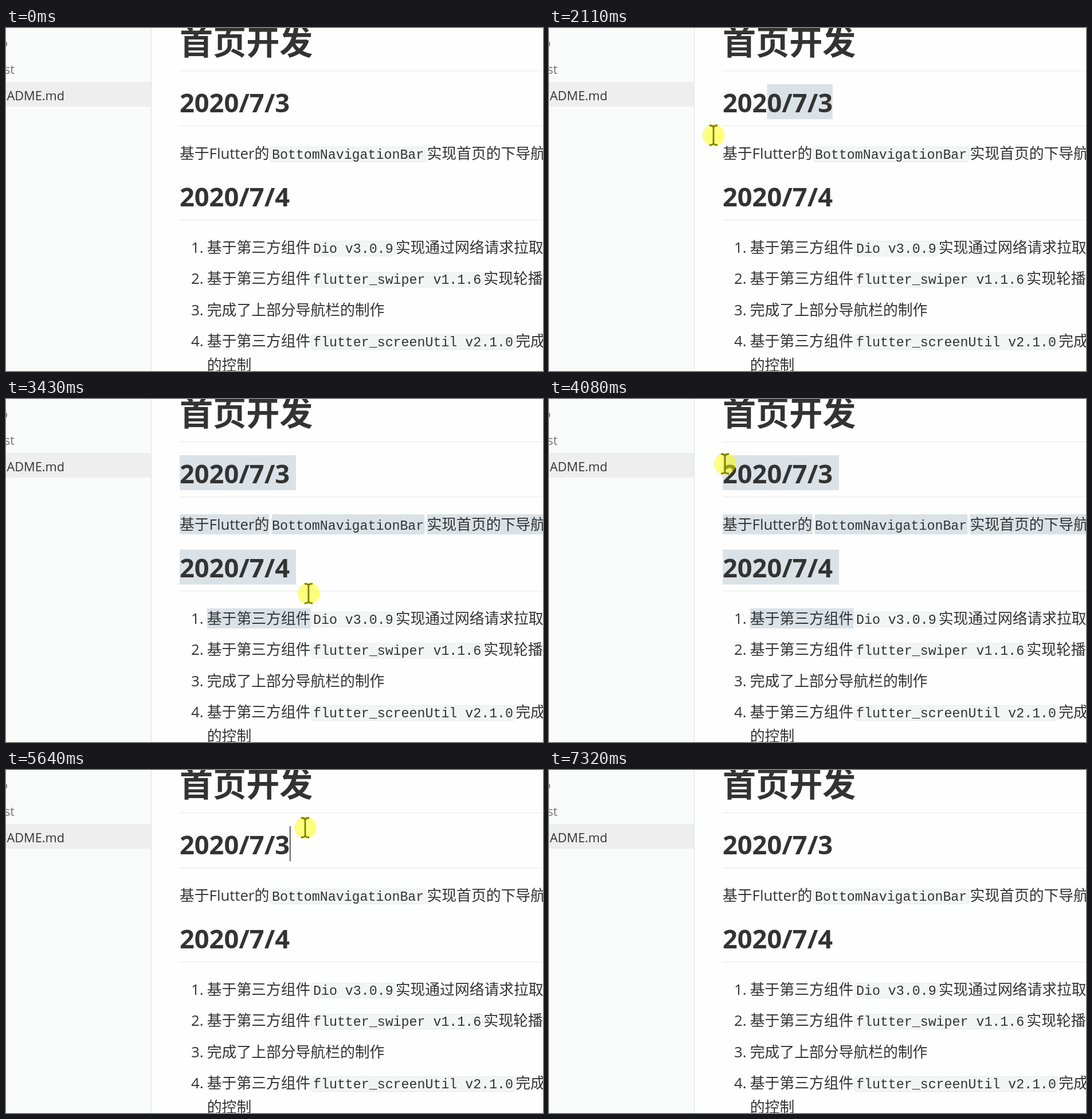
Recreate the animation shown at these times as an HTML page. Size 937 by 598 pixels, loop 7.55 s.

```html
<!DOCTYPE html>
<html lang="zh-CN">
<head>
<meta charset="utf-8">
<title>首页开发</title>
<style>
html, body { margin: 0; width: 100%; height: 100%; overflow: hidden; background: #fefefe; }
svg { display: block; width: 937px; height: 598px; }
text { font: 25.8px "Open Sans", "Noto Sans CJK SC", "Noto Sans CJK", sans-serif; fill: #333; white-space: pre; }
.h1 { font-size: 58.1px; font-weight: 700; }
.h2 { font-size: 45.2px; font-weight: 700; }
.code { font: 23.28px "Liberation Mono", monospace; }
.file { font-size: 21.7px; text-anchor: end; }
.dim { fill: #777; }
.box { fill: #f3f4f4; stroke: #e7eaed; }
.rule { fill: #eaecec; }
.sel { fill: #dae2e8; }
</style>
</head>
<body>
<svg viewBox="0 0 937 598">
  <rect width="253" height="598" fill="#f9fbfa"/>
  <rect y="94" width="253" height="43" fill="#eee"/>
  <rect x="253" width="1" height="598" fill="#dfe2e2"/>
  <g id="boxes"></g>
  <g id="selection"></g>
  <g id="words"></g>
  <rect id="caret" width="1.4" height="61" fill="#222"/>
  <g id="pointer">
    <path d="M-7-17Q0-17 0-13Q0-17 7-17M0-14V14M-7 17Q0 17 0 13Q0 17 7 17" fill="none" stroke="#000" stroke-width="2.8"/>
    <circle r="19.2" fill="#ff0" fill-opacity=".5"/>
  </g>
</svg>
<script>
const LOOP = 7550, BLINK = 530, STEP = 77;
const EM = 25.8, MONO = 13.97, LEFT = 303, INDENT = 350.8;
const NS = 'http://www.w3.org/2000/svg';
const $ = id => document.getElementById(id);

function make(tag, attrs, content) {
  const el = document.createElementNS(NS, tag);
  for (const key in attrs) el.setAttribute(key, attrs[key]);
  if (content) el.textContent = content;
  return el;
}
const add = (parent, ...spec) => $(parent).append(make(...spec));
const write = (x, y, content, cls = '') => add('words', 'text', { x, y, class: cls }, content);

// Page content
function code(x, y, content) {
  const width = content.length * MONO + 7;
  add('boxes', 'rect', { x: x - 3.5, y: y - 20.5, width, height: 26, rx: 4.5, class: 'box' });
  write(x, y, content, 'code');
}
function heading(y, content, cls) {
  write(LEFT, y, content, cls);
  add('boxes', 'rect', { x: LEFT, y: y + (cls === 'h1' ? 28.5 : 23), width: 634, height: 1.3, class: 'rule' });
}
write(3, 34, 'lib', 'file dim');
write(15, 80, 'test', 'file dim');
write(102, 126, 'README.md', 'file');
heading(45.5, '首页开发', 'h1');
heading(147, '2020/7/3', 'h2');
heading(311, '2020/7/4', 'h2');
write(LEFT, 228, '基于Flutter的');
code(464, 228, 'BottomNavigationBar');
write(734.5, 228, '实现首页的下导航');
const part = '基于第三方组件';
const items = [
  [part, 'Dio v3.0.9', '实现通过网络请求拉取'],
  [part, 'flutter_swiper v1.1.6', '实现轮播'],
  ['完成了上部分导航栏的制作'],
  [part, 'flutter_screenUtil v2.1.0', '完成']
];
items.forEach(([lead, name, rest], i) => {
  const y = 392 + i * 54.4;
  write(323, y, i + 1 + '.');
  write(INDENT, y, lead);
  if (!name) return;
  code(536, y, name);
  write(540 + name.length * MONO, y, rest);
});
write(INDENT, 597, '的控制');

// Pointer strokes: start, end, path, easing
const steady = s => s;
const settle = s => 1 - (1 - s) ** 2;
const strokes = [
  [70, 460, 'M759 585L262-40'],
  [700, 930, 'M337 0Q320 150 301 15'],
  [1080, 1810, 'M303 25C280 130 350 170 397 155L382 140'],
  [1860, 2110, 'M360 160Q320 220 287 187'],
  [2270, 2810, 'M295 215Q390 400 307 155'],
  [2960, 3510, 'M306.5 150L532.5 343', settle],
  [3680, 4080, 'M542 354L307 113', settle],
  [4310, 4540, 'M325 128L512.5 274.5'],
  [4620, 4770, 'M513 276L518 282'],
  [5090, 5150, 'M516 272L514 263'],
  [5320, 5460, 'M511 200L515 82'],
  [5640, 6300, 'M522 100.5L703 356', settle],
  [6400, 6470, 'M726 359V375'],
  [6620, 6790, 'M785 438L903 640']
].map(([start, end, d, ease = steady]) => {
  const path = make('path', { d });
  return { start, end, path, ease, length: path.getTotalLength() };
});
// Mouse button held: down, up
const presses = [[1810, 2810], [2960, 3510], [4540, 4770], [5460, 5730]]
  .map(([start, up]) => ({ start, up }));

const latest = (list, t) => list.filter(entry => entry.start <= t).pop();

// The pointer moves in equal hops of about STEP ms.
function pointerAt(t) {
  const stroke = latest(strokes, t);
  if (!stroke) return { x: -99, y: -99 };
  const { start, end, path, ease, length } = stroke;
  const hops = Math.round((end - start) / STEP);
  const done = Math.floor((t - start + 4) / (end - start) * hops);
  return path.getPointAtLength(length * ease(Math.min(done / hops, 1)));
}

// Selectable rows: end is where the text stops, runs are the highlighted spans.
const title = top => ({ top, height: 61, end: 495, runs: [[LEFT, 506]] });
const rows = [
  title(98),
  { top: 201, height: 35, end: 937, runs: [[LEFT, 459.5], [464, 730], [734.5, 937]] },
  title(262.5),
  { top: 365, height: 35, end: 532, runs: [[INDENT, 532]] }
];

// Text position under the pointer; the margin beside a gap belongs to the line above.
function hit({ x, y }) {
  const row = rows.findIndex(r => y < r.top + r.height);
  const { top, end, runs } = rows[row];
  if (row && y < top && x < LEFT) return { row: row - 1, x: rows[row - 1].end };
  const left = runs[0][0];
  const snapped = left + Math.round((x - left) / EM) * EM;
  return { row, x: Math.min(Math.max(snapped, left), end) };
}

function select(from, to) {
  for (let r = from.row; r <= to.row; r++) {
    const { top: y, height, runs } = rows[r];
    for (const [left, right] of runs) {
      const x = r === from.row ? Math.max(left, from.x) : left;
      const end = r === to.row ? Math.min(right, to.x) : right;
      if (end > x) add('selection', 'rect', { x, y, width: end - x, height, class: 'sel' });
    }
  }
}

function draw(t) {
  const { x, y } = pointerAt(t);
  $('pointer').setAttribute('transform', `translate(${x},${y})`);
  $('selection').replaceChildren();
  $('caret').setAttribute('visibility', 'hidden');
  const press = latest(presses, t);
  if (!press) return;

  const ends = [press.start, Math.min(t, press.up)].map(time => hit(pointerAt(time)));
  const [from, to] = ends.sort((a, b) => a.row - b.row || a.x - b.x);
  if (from.row !== to.row || from.x !== to.x) return select(from, to);
  const lit = t < press.up || Math.floor((t - press.up) / BLINK) % 2 === 0;
  if (!lit) return;
  $('caret').setAttribute('visibility', 'visible');
  $('caret').setAttribute('transform', `translate(${from.x},${rows[from.row].top})`);
}

const begin = performance.now();
function tick() {
  draw((performance.now() - begin) % LOOP);
  requestAnimationFrame(tick);
}
draw(0);
requestAnimationFrame(tick);
</script>
</body>
</html>
```
